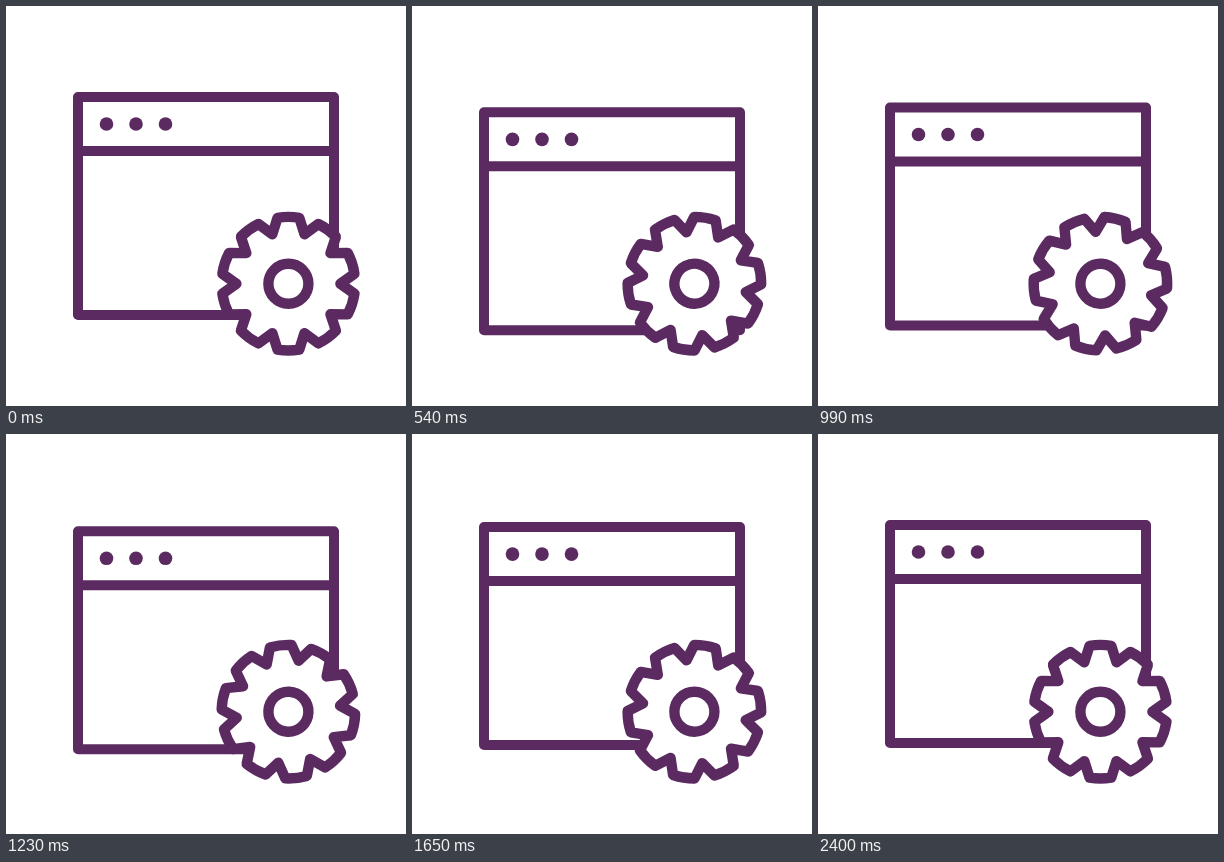
These frames come from a looping animation (400x400 px, 4430 ms). An HTML page with a canvas:

```html
<!DOCTYPE html>
<html lang="en">
<head>
<meta charset="utf-8">
<title>Window and gear</title>
<style>
  html, body { margin: 0; width: 100%; height: 100%; overflow: hidden; background: #fff; }
  canvas { display: block; width: 100vmin; height: 100vmin; }
</style>
</head>
<body>
<canvas width="400" height="400"></canvas>
<script>
const ctx = document.querySelector('canvas').getContext('2d');
const INK = '#5b2a60';
const LOOP = 4430, STEP = 30, REST = 2400;
const PEAK = 600, END = 2430;
const DROP = 15.6, TURN = 339;
const TEETH = 10, PITCH = 2 * Math.PI / TEETH;
const HUB = { x: 282.4, y: 277.7 };

function bezier(x1, y1, x2, y2) {
  const at = (a, b, s) => 3 * a * s * (1 - s) ** 2 + 3 * b * s * s * (1 - s) + s ** 3;
  return x => {
    let lo = 0, hi = 1;
    for (let i = 0; i < 24; i++) {
      const mid = (lo + hi) / 2;
      if (at(x1, x2, mid) < x) lo = mid; else hi = mid;
    }
    return at(y1, y2, lo);
  };
}
const easeOut = bezier(0, 0, 0.58, 1);
const ease = bezier(0.25, 0.1, 0.25, 1);

// 0 at rest, 1 with the window lowered and the gear wound up
function pose(t) {
  if (t >= REST) return 0;
  return t < PEAK ? easeOut(t / PEAK) : 1 - ease((t - PEAK) / (END - PEAK));
}

function disc(x, y, r) {
  ctx.beginPath();
  ctx.arc(x, y, r, 0, 2 * Math.PI);
}

function drawWindow(dy) {
  ctx.save();
  ctx.translate(0, dy);
  ctx.lineWidth = 10;
  ctx.strokeRect(72, 91, 256, 218);
  ctx.beginPath();
  ctx.moveTo(72, 145);
  ctx.lineTo(328, 145);
  ctx.stroke();
  for (const x of [100.5, 130, 159.5]) {
    disc(x, 118, 6.8);
    ctx.fill();
  }
  ctx.restore();
}

function drawGear(angle) {
  const rim = 66.8, root = 52, half = PITCH * 0.26;
  ctx.save();
  ctx.translate(HUB.x, HUB.y);
  ctx.rotate(angle);
  ctx.beginPath();
  for (let i = 0; i < TEETH; i++) {
    const mid = i * PITCH - Math.PI / 2;
    const gap = mid + PITCH / 2;
    ctx.arc(0, 0, rim, mid - half, mid + half);
    ctx.lineTo(root * Math.cos(gap), root * Math.sin(gap));
  }
  ctx.closePath();
  ctx.fillStyle = '#fff';
  ctx.fill();
  ctx.lineWidth = 10.4;
  ctx.stroke();
  disc(0, 0, 20);
  ctx.stroke();
  ctx.restore();
}

function draw(now) {
  const t = Math.floor((now % LOOP) / STEP) * STEP;
  const p = pose(t);
  ctx.fillStyle = '#fff';
  ctx.fillRect(0, 0, 400, 400);
  ctx.fillStyle = ctx.strokeStyle = INK;
  ctx.lineJoin = 'round';
  drawWindow(DROP * p);
  drawGear(TURN * p * Math.PI / 180);
}

let start;
function tick(now) {
  start ??= now;
  draw(now - start);
  requestAnimationFrame(tick);
}
draw(0);
requestAnimationFrame(tick);
</script>
</body>
</html>
```
